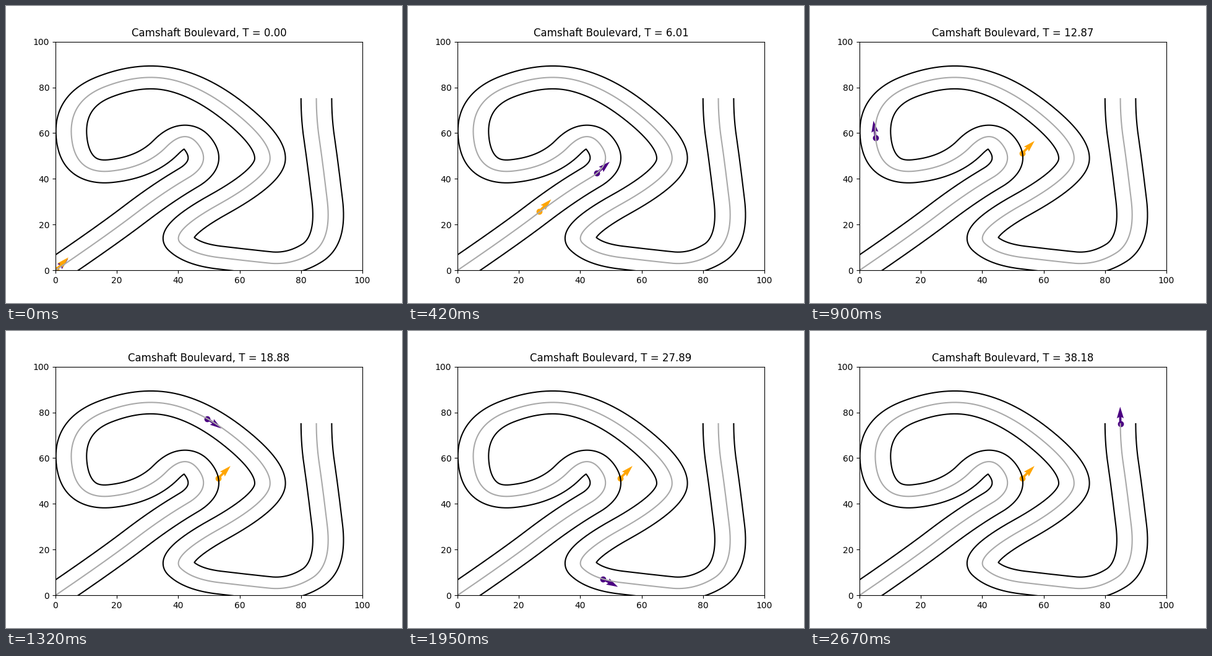
Animation of 640 by 480 pixels, one loop 2700 ms. Source, as a matplotlib script:

```python
import matplotlib.pyplot as plt
import numpy as np
from matplotlib.animation import FuncAnimation

FRAMES, INTERVAL = 90, 30
TIME_STEP = 0.42902
HALF_WIDTH = 5
TITLE = "Camshaft Boulevard, T = {:.2f}"

# Corners of the polygon that the track rounds off
CORNERS = np.array([
    (0, 0), (17, 15.5), (35, 34), (51, 46.5), (42.5, 62.7),
    (29.5, 45), (6.5, 41.8), (4, 74), (28, 86.5), (48.5, 80),
    (70.3, 56), (69.5, 41), (37, 16.8), (44.5, 7), (62, 4.2),
    (77, 2.1), (90.1, 13), (87, 48), (85, 66), (85, 75),
])

# The orange car drives straight until it leaves the track
ORANGE_START = np.array([0.3, 0.4])
ORANGE_END = np.array([53.1, 51.3])
ORANGE_STOP_FRAME = 28.1


def quadratic_spline(corners, samples=90):
    """One parabola per inner corner, joined at the middles of the sides."""
    joints = (corners[:-1] + corners[1:]) / 2
    joints[0], joints[-1] = corners[0], corners[-1]
    t = np.linspace(0, 1, samples, endpoint=False)[:, None]
    arcs = [(1 - t)**2 * a + 2 * t * (1 - t) * corner + t**2 * b
            for a, corner, b in zip(joints, corners[1:-1], joints[1:])]
    return np.vstack(arcs + [corners[-1:]])


def offset_edge(line, normal, distance):
    """Parallel curve without the loops inside tight bends."""
    edge = line + distance * normal
    gap = np.hypot(edge[:, None, 0] - line[None, :, 0],
                   edge[:, None, 1] - line[None, :, 1]).min(axis=1)
    return edge[gap > abs(distance) - 0.01]


center = quadratic_spline(CORNERS)
arc = np.append(0, np.cumsum(np.hypot(*np.diff(center, axis=0).T)))
tangent = np.gradient(center, arc, axis=0)
tangent /= np.hypot(*tangent.T)[:, None]
normal = np.column_stack([-tangent[:, 1], tangent[:, 0]])


def along(values, s):
    return np.array([np.interp(s, arc, column) for column in values.T])


fig, ax = plt.subplots(figsize=(6.4, 4.8), dpi=100)
ax.set_xlim(0, 100)
ax.set_ylim(0, 100)
ax.plot(*center.T, color="darkgray")
for side in (HALF_WIDTH, -HALF_WIDTH):
    ax.plot(*offset_edge(center, normal, side).T, color="black")
title = ax.set_title(TITLE.format(0))


class Car:
    def __init__(self, color):
        self.dot = ax.scatter([0], [0], color=color)
        self.arrow = ax.quiver([0], [0], [1], [1], color=color, scale=18)

    def place(self, position, heading):
        u, v = heading / np.hypot(*heading)
        self.dot.set_offsets([position])
        self.arrow.set_offsets([position])
        self.arrow.set_UVC([u], [v])


indigo = Car("indigo")
orange = Car("orange")


def update(frame):
    s = arc[-1] * frame / (FRAMES - 1)
    # The heading trails the road a little
    indigo.place(along(center, s), along(tangent, max(s - 2, 0)))
    progress = min(1, frame / ORANGE_STOP_FRAME)
    orange.place(ORANGE_START + (ORANGE_END - ORANGE_START) * progress,
                 np.array([1, 1]))
    title.set_text(TITLE.format(frame * TIME_STEP))
    return []


anim = FuncAnimation(fig, update, frames=FRAMES, interval=INTERVAL,
                     init_func=lambda: update(0), repeat=True, repeat_delay=0)
plt.show()
```
